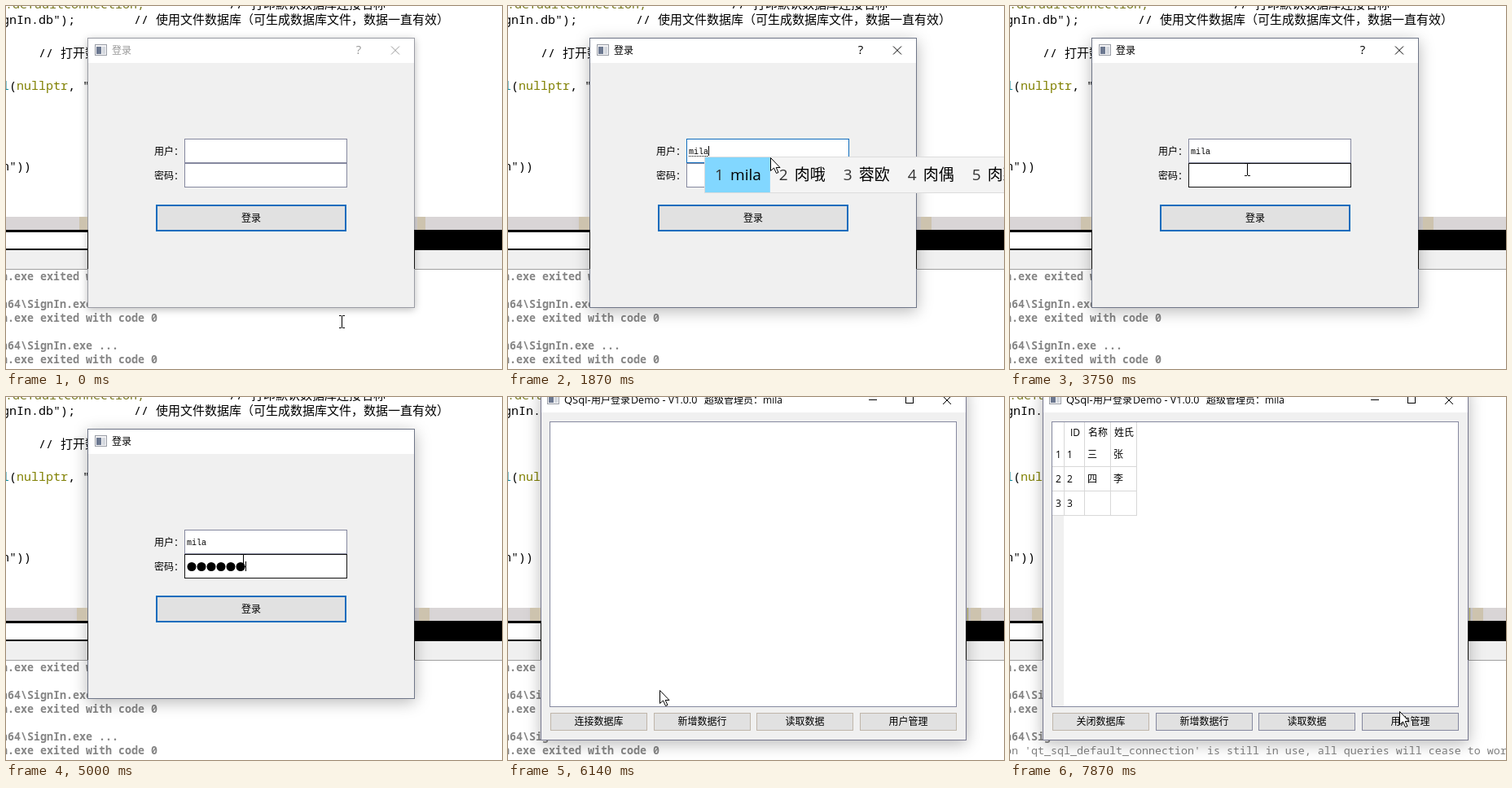
Animation of 609x446 px, one loop 8 s. Source, as an HTML page with a canvas:

```html
<!DOCTYPE html>
<html lang="zh-CN">
<head>
<meta charset="utf-8">
<title>登录</title>
<style>
  html, body { margin: 0; width: 100%; height: 100%; overflow: hidden; background: #fff; }
  canvas { display: block; }
</style>
</head>
<body>
<canvas id="stage" width="609" height="446"></canvas>
<script>
const W = 609, H = 446, LOOP = 8000, STEP = 125;
const view = document.getElementById('stage').getContext('2d');
const layer = Object.assign(document.createElement('canvas'), { width: W, height: H }).getContext('2d');
let c = view;

const CJK = '"Noto Sans CJK SC", "Noto Sans CJK JP"';
const UI = `12px "Open Sans", ${CJK}, sans-serif`;
const CODE = `15px "Noto Sans Mono", ${CJK}, monospace`;
const LOG = '13.33px "Noto Sans Mono", monospace';
const USER = 'mila';
const BLUE = '#0f6cbd', FRAME = '#85889f', TAN = '#cdc3ae';

// Cursor keys: step, x, y
const PATH = [
  [0, 412, 388], [5, 322, 186], [22, 322, 186], [27, 291, 201], [40, 291, 201],
  [41, 289, 200], [45, 289, 200], [49, 186, 360], [52, 130, 399], [53, 130, 399],
  [56, 238, 399], [59, 365, 399], [61, 442, 399], [63, 478, 386]
];

function rect(x, y, w, h, color) {
  c.fillStyle = color;
  c.fillRect(x, y, w, h);
}

function box(x, y, w, h, fill, edge, line = 1) {
  rect(x, y, w, h, edge);
  rect(x + line, y + line, w - 2 * line, h - 2 * line, fill);
}

function text(s, x, y, font = UI, color = '#000', align = 'left') {
  c.font = font;
  c.fillStyle = color;
  c.textAlign = align;
  c.fillText(s, x, y);
}

function stroke(color, ...lines) {
  c.strokeStyle = color;
  c.lineWidth = 1;
  c.beginPath();
  for (const [x1, y1, x2, y2] of lines) {
    c.moveTo(x1, y1);
    c.lineTo(x2, y2);
  }
  c.stroke();
}

function cross(x, y, color) {
  stroke(color, [x - 5, y - 5, x + 5, y + 5], [x - 5, y + 5, x + 5, y - 5]);
}

function appIcon(x, y) {
  box(x, y, 15, 14, '#f4f4f6', '#9a9ea6');
  rect(x + 2, y + 3, 6, 9, '#6c7890');
  rect(x + 9, y + 3, 4, 9, '#d4d8de');
}

function pointAt(k) {
  const i = Math.max(1, PATH.findIndex(p => p[0] >= k));
  const [k0, x0, y0] = PATH[i - 1], [k1, x1, y1] = PATH[i];
  const u = (k - k0) / (k1 - k0);
  return [Math.round(x0 + (x1 - x0) * u), Math.round(y0 + (y1 - y0) * u)];
}

function editor(k) {
  rect(0, 0, W, H, '#fff');
  text('.defaultConnection;', -1, 3, CODE, '#7a7a20');
  text('// 打印默认数据库连接名称', 274, 3, CODE);
  text('gnIn.db");', -5, 22, CODE);
  text('// 使用文件数据库（可生成数据库文件，数据一直有效）', 157, 22, CODE);
  text('// 打开数据库', 40, 63, CODE);
  text('l', -5, 103, CODE, '#00879c');
  text('(', 4, 103, CODE);
  text('nullptr', 13, 103, CODE, '#808000');
  text(', "Error", "打开数据库失败！");', 76, 103, CODE);
  text('n"))', -5, 202, CODE);

  rect(0, 259, W, 16, '#d9d5d6');
  rect(0, 275, W, 25, '#000');
  rect(0, 278, 112, 20, '#fff');
  stroke('#ddd', [117, 288.5, 128, 288.5], [122.5, 283, 122.5, 294], [140, 288.5, 151, 288.5]);
  rect(0, 300, W, 23, '#f0f0f0');
  rect(0, 323, W, 1, '#a0a0a0');

  const start = 'a64\\SignIn.exe ...', end = 'n.exe exited with code 0';
  const log = (s, y) => text(s, -6, y, 'bold ' + LOG, '#858585');
  log(end, 337);
  log(start, 371);
  log(end, 388);
  log(start, 422);
  if (k < 53) log(end, 439);
  else text("on 'qt_sql_default_connection' is still in use, all queries will cease to work", -6, 439, LOG, '#808080');
}

function frame(x, y, w, h, edge, active) {
  const reach = active ? 13 : 10, gap = active ? 5 : 3;
  c.save();
  c.shadowColor = active ? 'rgba(0,0,0,.28)' : 'rgba(0,0,0,.26)';
  c.shadowBlur = active ? 18 : 9;
  c.shadowOffsetY = active ? 4 : 2;
  rect(x, y, w, h, edge);
  c.restore();
  rect(x - reach, 259, reach, 16, TAN);
  rect(x + w + gap, 259, reach, 16, TAN);
  rect(x, 275, w, 48, '#111');
  rect(x + 1, y + 1, w - 2, h - 2, '#f0f0f0');
}

function dialog(k) {
  const active = k >= 5, ink = active ? '#000' : '#999';
  frame(100, 39, 402, 332, active ? '#6f7688' : '#9a9ca4', active);
  rect(101, 40, 400, 30, '#fff');
  appIcon(109, 47);
  text('登录', 130, 59, UI, ink);
  if (k < 40) {
    text('?', 433, 59, '15px "Open Sans", sans-serif', ink, 'center');
    cross(478, 54.5, ink);
  }

  const onUser = k >= 5 && k < 27, onPass = k >= 27;
  text('用户：', 182, 183);
  text('密码：', 182, 213);
  box(219, 163, 200, 30, '#fff', onUser ? BLUE : FRAME);
  box(219, 193, 200, 30, '#fff', onPass ? '#151515' : FRAME);
  box(184, 244, 234, 33, '#e1e1e1', BLUE, 2);
  text('登录', 301, 265, UI, '#000', 'center');

  const typed = k < 12 ? 0 : k < 14 ? 1 : k < 15 ? 2 : 4;
  text(USER.slice(0, typed), 222, 182, '10px "Liberation Mono", monospace');
  if (k < 17) for (let i = 0; i < typed * 3; i++) rect(222 + 2 * i, 184, 1, 1, '#000');

  const dots = k < 33 ? 0 : k < 35 ? k - 32 : k < 37 ? 3 : k < 38 ? 4 : 6;
  c.fillStyle = '#000';
  for (let i = 0; i < dots; i++) {
    c.beginPath();
    c.arc(228 + 12 * i, 208.5, 5.5, 0, 7);
    c.fill();
  }

  const blink = (k >= 9 && k < 12) || (k >= 21 && k < 25) || (k >= 30 && k < 33);
  if (onUser && !blink) rect(222 + 6 * typed, 172, 1, 12, '#000');
  if (onPass && !blink) rect(222 + 12 * dots, 202, 1, 12, '#000');
  if (k >= 12 && k < 17) candidates(typed);
}

function candidates(typed) {
  const words = typed === 1 ? [...'人让日如热'] :
    typed === 2 ? [...'肉柔若揉容'] : [USER, '肉哦', '蓉欧', '肉偶', '肉藕'];
  const font = `19px "Open Sans", ${CJK}, sans-serif`;
  box(241, 185, 400, 45, '#f4f4f4', '#dcdcdc');
  let x = 254;
  words.forEach((word, i) => {
    c.font = font;
    const w = c.measureText(word).width;
    if (!i) rect(242, 186, 42 + w, 43, '#82d7ff');
    text(i + 1, x, 214, font, '#333');
    text(word, x + 19, 214, font);
    x += 41 + w;
  });
}

function table() {
  rect(52, 146, 14, 234, '#f0f0f0');
  stroke('#d8d8d8',
    ...[66.5, 91.5, 123.5, 155.5].map(x => [x, 31, x, 146]),
    ...[85.5, 115.5, 145.5].map(y => [52, y, 156, y]));
  text('ID', 80, 48, UI, '#000', 'center');
  text('名称', 96, 48);
  text('姓氏', 128, 48);
  [['三', '张'], ['四', '李'], ['', '']].forEach(([first, last], i) => {
    const y = 75 + 30 * i;
    text(i + 1, 56, y);
    text(i + 1, 70, y);
    text(first, 95, y);
    text(last, 127, y);
  });
}

function mainWindow(k, [mx, my]) {
  frame(40, -12, 523, 434, '#77788f', true);
  rect(564, 259, 1, 16, '#9c9a50');
  rect(41, -12, 521, 31, '#fff');
  appIcon(48, -5);
  text('QSql-', 69, 8, '13px "Open Sans", sans-serif');
  text('用户登录', 102, 8);
  text('Demo - V1.0.0', 151, 8, '12.5px "Open Sans", sans-serif');
  text('超级管理员：', 241, 8);
  text(USER, 313, 8);
  stroke('#000', [443, 3.5, 453, 3.5]);
  box(488, -2, 10, 10, '#fff', '#000');
  cross(539, 4, '#000');

  box(51, 30, 500, 351, '#fff', FRAME);
  if (k >= 59) table();

  const open = k >= 53;
  [open ? '关闭数据库' : '连接数据库', '新增数据行', '读取数据', '用户管理'].forEach((label, i) => {
    const x = Math.round(52 + 126.6 * i);
    const hover = mx >= x && mx < x + 119 && my >= 388 && my < 410;
    box(x, 388, 119, 22, hover ? '#e5f1fb' : '#e1e1e1', hover ? '#0078d7' : open && i ? FRAME : '#c0b6aa');
    text(label, x + 59.5, 403, UI, '#000', 'center');
  });
}

function arrow(x, y) {
  c.beginPath();
  [[0, 0], [0, 16], [4, 12.5], [7, 19], [9.5, 18], [6.7, 12], [11.5, 12]]
    .forEach(([dx, dy]) => c.lineTo(x + dx + .5, y + dy + .5));
  c.closePath();
  c.fillStyle = '#fff';
  c.fill();
  c.strokeStyle = '#000';
  c.lineWidth = 1;
  c.stroke();
}

function beam(x, y) {
  stroke('#000', [x + .5, y - 7, x + .5, y + 7],
    [x - 3, y - 7.5, x, y - 7.5], [x + 1, y - 7.5, x + 4, y - 7.5],
    [x - 3, y + 7.5, x, y + 7.5], [x + 1, y + 7.5, x + 4, y + 7.5]);
}

function cursor(k, [x, y]) {
  const hidden = (k >= 11 && k < 15) || (k >= 17 && k < 23);
  if (hidden) return;
  const moving = k > 0 && k < 5;
  (moving || k === 15 || k === 16 || k > 40 ? arrow : beam)(x, y);
}

function draw(now) {
  const k = Math.min(63, Math.floor((now % LOOP + 8) / STEP));
  const mouse = pointAt(k);
  c = view;
  editor(k);
  if (k < 41) dialog(k);
  else {
    const [alpha, scale] = k === 41 ? [.45, .97] : k === 42 ? [.93, .9962] : [1, 1];
    c = layer;
    c.clearRect(0, 0, W, H);
    mainWindow(k, mouse);
    c = view;
    c.save();
    c.globalAlpha = alpha;
    c.translate(301, 205);
    c.scale(scale, scale);
    c.drawImage(layer.canvas, -301, -205);
    c.restore();
  }
  cursor(k, mouse);
}

const begin = performance.now();
function tick() {
  draw(performance.now() - begin);
  requestAnimationFrame(tick);
}
tick();
</script>
</body>
</html>
```
